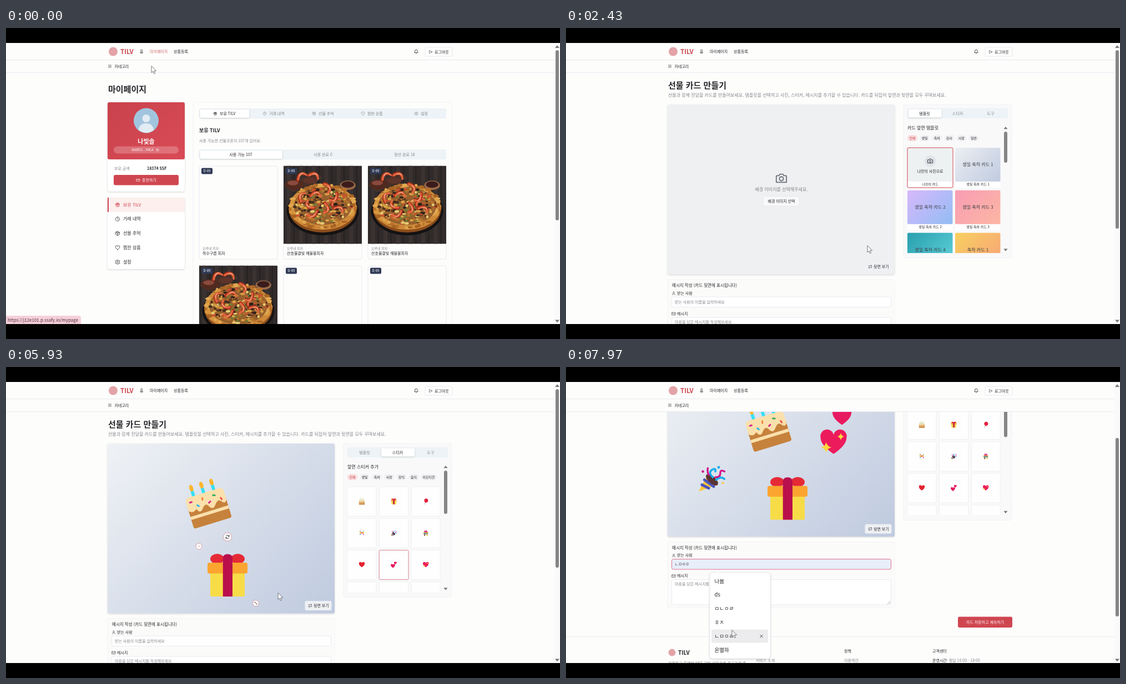
These frames come from a looping animation (998 by 561 pixels, 8000 ms). An HTML page:

```html
<!DOCTYPE html>
<html lang="ko">
<head>
<meta charset="utf-8">
<style>
html, body { margin: 0; width: 100%; height: 100%; overflow: hidden; background: #000; }
svg { display: block; width: 998px; height: 561px; font-family: "Noto Sans CJK KR", "Noto Sans CJK", "Noto Sans", sans-serif; }
.soft { filter: drop-shadow(0 1px 1.5px rgba(0,0,0,.16)); }
</style>
</head>
<body>
<svg id="stage" viewBox="0 0 998 561"></svg>
<script>
const RED = '#cf4650', INK = '#27272c', GRAY = '#85868c', LINE = '#e9eaf1', PAPER = '#fdfdfc', TABS = '#edf3f6';
const BRAND = 'TILV', SHOP = '모루네 피자', DISH = '산호물결빛 해물볼피자';

// Drawing helpers: each returns SVG markup
const rect = (x, y, w, h, fill, r = 0, stroke = 'none', more = '') =>
  `<rect x="${x}" y="${y}" width="${w}" height="${h}" rx="${r}" fill="${fill}" stroke="${stroke}" ${more}/>`;
const circle = (x, y, r, fill, stroke = 'none') => `<circle cx="${x}" cy="${y}" r="${r}" fill="${fill}" stroke="${stroke}"/>`;
const text = (x, y, size, str, fill = INK, weight = 400, anchor = 'start') =>
  `<text x="${x}" y="${y}" font-size="${size}" fill="${fill}" font-weight="${weight}" text-anchor="${anchor}">${str}</text>`;
const mid = (x, y, size, str, fill, weight) => text(x, y, size, str, fill, weight, 'middle');
const path = (d, fill, stroke = 'none', width = 1) =>
  `<path d="${d}" fill="${fill}" stroke="${stroke}" stroke-width="${width}" stroke-linecap="round" stroke-linejoin="round"/>`;
const line = (y, x = 0, w = 988) => rect(x, y, w, 1, LINE);
const group = (id, body, more = '') => `<g id="${id}" ${more}>${body}</g>`;
const times = (n, fn) => Array.from({ length: n }, (_, i) => fn(i)).join('');
const use = (id, x, y, size) => `<use href="#${id}" x="${x - size / 2}" y="${y - size / 2}" width="${size}" height="${size}"/>`;
const symbol = (id, size, body, overflow = 'visible') => `<symbol id="${id}" viewBox="0 0 ${size} ${size}" overflow="${overflow}">${body}</symbol>`;

let gradients = 0;
function gradientRect(x, y, w, h, from, to, r = 2) {
  const id = 'grad' + gradients++, k = (w + h) / 4, cx = x + w / 2, cy = y + h / 2;
  return `<linearGradient id="${id}" gradientUnits="userSpaceOnUse" x1="${cx - k}" y1="${cy - k}" x2="${cx + k}" y2="${cy + k}">
    <stop stop-color="${from}"/><stop offset="1" stop-color="${to}"/></linearGradient>` + rect(x, y, w, h, `url(#${id})`, r);
}

// Line icons on a 24 unit grid
const icons = {
  bell: 'M6 9a6 6 0 0 1 12 0c0 6 3 8 3 8H3s3-2 3-8M10 21h4',
  logout: 'M9 21H4V3h5M16 17l5-5-5-5M21 12H9',
  menu: 'M3 5h18M3 12h18M3 19h18',
  gift: 'M3 8h18v4H3zM5 12v9h14v-9M12 8v13M12 8C5 8 5 2 9 3q2 1 3 5c0-5 5-7 6-3q0 3-6 3',
  clock: 'M12 2a10 10 0 1 0 .1 0M12 6v6l4 2',
  box: 'M12 2l9 5v10l-9 5-9-5V7zM3 7l9 5 9-5M12 12v10M7 4l9 5',
  heart: 'M12 21C4 15 2 12 2 8a5 5 0 0 1 10-2 5 5 0 0 1 10 2c0 4-2 7-10 13z',
  gear: 'M10 2h4l1 3 3 1 3-1 1 4-2 3 2 3-1 4-3-1-3 1-1 3h-4l-1-3-3-1-3 1-1-4 2-3-2-3 1-4 3 1 3-1zM12 9a3 3 0 1 0 .1 0',
  copy: 'M8 8h13v13H8zM16 8V3H3v13h5',
  card: 'M2 5h20v14H2zM2 10h20',
  back: 'M15 18l-6-6 6-6',
  camera: 'M3 7h4l2-3h6l2 3h4q1 0 1 1v11q0 1-1 1H3q-1 0-1-1V8q0-1 1-1M12 9a4 4 0 1 0 .1 0',
  user: 'M12 3a4.5 4.5 0 1 0 .1 0M4 22q0-8 8-8t8 8',
  mail: 'M2 4h20v16H2zM2 7l10 7 10-7',
  swap: 'M17 2l4 4-4 4M3 11V6h18M7 22l-4-4 4-4M21 13v5H3',
  turn: 'M21 3v6h-6M21 9A9 9 0 0 0 4 8M3 21v-6h6M3 15a9 9 0 0 0 17 1',
  scale: 'M10 3H3v7M3 3l18 18M14 21h7v-7',
  close: 'M5 5l14 14M19 5L5 19',
  move: 'M12 1v22M1 12h22M9 4l3-3 3 3M9 20l3 3 3-3M4 9l-3 3 3 3M20 9l3 3-3 3'
};
const icon = (name, x, y, size = 8, color = INK, width = 2) =>
  `<g transform="translate(${x - size / 2} ${y - size / 2}) scale(${size / 24})">${path(icons[name], 'none', color, width)}</g>`;

let seed = 7;
const random = () => (seed = seed * 16807 % 2147483647) / 2147483647;
const ellipse = (x, y, rx, ry, fill) => `<ellipse cx="${x}" cy="${y}" rx="${rx}" ry="${ry}" fill="${fill}"/>`;
// Small blobs inside an ellipse; inner = 0 fills it, towards 1 leaves only its rim
const scatter = (n, rx, ry, inner, size, palette) => times(n, () => {
  const a = random() * 6.283, d = Math.sqrt(inner + (1 - inner) * random());
  return ellipse(50 + Math.cos(a) * d * rx, 52 + Math.sin(a) * d * ry, size * (.6 + random()), size * (.5 + random() * .5), palette[random() * palette.length | 0]);
});
const shrimp = (x, y, turn) => `<g transform="translate(${x} ${y}) rotate(${turn})">` +
  path('M-5 5Q-6-4 1-4', 'none', '#a5301c', 4) + path('M-4.5 4.5Q-5-4.5 1-4.5L5-3', 'none', '#e2663f', 2.4) + path('M-3.5 0Q-3-4 0-4.5', 'none', '#f3b08c', .9) + '</g>';

const pizza = rect(0, 0, 100, 100, '#302b2a') +
  times(7, i => rect(i * 16 - 3, 0, .7, 100, '#1f1b1b') + rect(i * 16 + 4, 0, 5, 100, '#3a3331')) +
  path('M0 25L42 8l8 8L12 34z', '#46312a') + ellipse(14, 24, 12, 6.5, '#51291f') + ellipse(12, 22, 7, 3, '#8a4a3d') +
  ellipse(34, 19, 9, 4, '#5e3329') + shrimp(24, 14, 10) + shrimp(39, 14, 60) +
  ellipse(82, 25, 10, 6, '#9a6a48') + ellipse(82, 24, 8, 4.2, '#3a1c1c') +
  ellipse(50, 58, 46, 31, '#141213') + ellipse(50, 55.5, 43.5, 30, '#8a4c1b') + ellipse(50, 53, 43, 29, '#cc8838') +
  scatter(90, 42, 28, .75, 2.6, ['#e0a850', '#b8702a', '#d8963e', '#a86324']) + ellipse(50, 51.5, 37, 24, '#96602d') +
  scatter(230, 37, 23, 0, 2, ['#d9a445', '#4a3020', '#6f7d36', '#e6ca74', '#643823', '#b5722c', '#2d211b', '#c9542f']) +
  times(9, i => shrimp(50 + (17 + i % 2 * 10) * Math.cos(i * .7), 46 + (9 + i % 2 * 8) * Math.sin(i * .7), i * 67));

const heartPath = 'M16 29C6 22 1 16 1 10A7.6 7.6 0 0 1 16 7A7.6 7.6 0 0 1 31 10C31 16 26 22 16 29Z';
const star = (x, y, r) => path(`M${x} ${y - r}Q${x + r * .2} ${y - r * .2} ${x + r} ${y}Q${x + r * .2} ${y + r * .2} ${x} ${y + r}Q${x - r * .2} ${y + r * .2} ${x - r} ${y}Q${x - r * .2} ${y - r * .2} ${x} ${y - r}`, '#fcd83e');
const sprinkles = ['#d4218b', '#20b0e8', '#f08030', '#d4218b', '#3aa860', '#f05050'];

const defs = '<defs>' + symbol('pizza', 100, pizza, 'hidden') +
  symbol('cake', 32,
    [8, 16, 24].map(x => rect(x - 1.2, 5, 2.4, 7, '#35e0f2') + ellipse(x, 2.8, 1.5, 2.6, '#fdb62f')).join('') +
    rect(1, 16, 30, 17, '#c6823c', 1.5) + rect(1, 23.5, 30, 2.4, '#fae0ac') +
    path('M1 12q0-3 3-3h24q3 0 3 3v7q-2 3-4 0t-5 1-5 0-5 0-5-1q-3 3-6 0z', '#fae0ac') +
    sprinkles.map((c, i) => `<g transform="rotate(${i * 50} ${4.5 + i * 4.6} ${13 + i % 2 * 4})">${rect(3.2 + i * 4.6, 12.4 + i % 2 * 4, 2.7, 1.2, c, .6)}</g>`).join('')) +
  symbol('gift', 32, rect(3.6, 14, 24.8, 17.6, '#f7dc48', 1) + ellipse(8.6, 4.4, 5, 3.6, '#e52a36') + ellipse(23.4, 4.4, 5, 3.6, '#e52a36') +
    rect(1.6, 7.2, 28.8, 7.8, '#fba530', 1.2) + path('M12.7 31.6V4q0-3 3.4-3t3.5 3v27.6z', '#b90f4b')) +
  symbol('balloon', 32, path('M15 20Q8 25 9 32', 'none', '#888', 1.4) + ellipse(18, 11, 10, 10.5, '#e3203c') + path('M14 20l-2 4 5-1z', '#b81730')) +
  symbol('ball', 32, path('M4 9l12 4 12-4-2 10-10-3-10 3z', '#f2c02e') + circle(16, 14, 4, '#e33b6b') + circle(8, 22, 3, '#2fa3d8') + circle(24, 23, 3, '#d33b9e') + rect(6, 4, 4, 4, '#7b4a3a') + rect(22, 4, 4, 4, '#3aa860')) +
  symbol('popper', 32, path('M10 13L23 24 0 32z', '#fdc93a') + path('M7 18l11 8M4 24l8 4', 'none', '#4b55be', 3.4) +
    `<g transform="rotate(42 16 18)">${ellipse(16, 18, 9, 4.2, '#5b3434')}</g>` +
    path('M17 15q-6-6-1-9t4 2M21 18q5-5 10-1', 'none', '#18aeee', 2.4) + path('M12 12q-2-4-1-8M20 15q6 0 6-5t5-2', 'none', '#d2128a', 2.2) +
    circle(24, 3, 1.6, '#18aeee') + circle(5, 8, 1.5, '#d2128a') + circle(29, 22, 1.4, '#fdc93a')) +
  symbol('pinata', 32, rect(4, 10, 24, 12, '#e0913a', 2) + rect(8, 2, 16, 9, '#e0418a', 2) + rect(6, 16, 20, 5, '#3aa5c8') + rect(7, 22, 6, 8, '#8a4a34') + rect(20, 22, 6, 8, '#f0c030')) +
  symbol('heart', 32, path(heartPath, '#e5202f')) +
  symbol('hearts', 32, `<g transform="translate(-.6 10.5) scale(.75)">${path(heartPath, '#e81a60')}</g><g transform="translate(16.2 -1) scale(.49)">${path(heartPath, '#e81a60')}</g>`) +
  symbol('sparkle', 32, path(heartPath, '#ec1b5c') + star(7.5, 21.5, 6) + star(24.3, 9, 4)) +
  `<clipPath id="panelClip">${rect(608, 208, 180, 198, '#000')}</clipPath></defs>`;

const badge = (x, y) => rect(x, y, 20, 11, '#303a55', 2) + mid(x + 10, y + 7.8, 6, 'D-89', '#fff', 500);
const arrowUp = (x, y, s = 4) => path(`M${x - s} ${y + s / 2}h${2 * s}l${-s} ${-s * 1.2}z`, '#757575');
const arrowDown = (x, y, s = 4) => path(`M${x - s} ${y - s / 2}h${2 * s}l${-s} ${s * 1.2}z`, '#757575');

const header = rect(0, 27, 998, 53, PAPER) + line(57) + line(80) + circle(193, 42.5, 8, '#e3a3a7') +
  text(206, 46.7, 11.5, BRAND, RED, 700) + text(241, 45, 7, '홈') + group('navMine', text(259, 45, 7, '마이페이지')) +
  text(302, 45, 7, '상품등록') + icon('bell', 739, 42.5, 9) + rect(755, 35, 49, 16, PAPER, 2, LINE) + icon('logout', 765, 43, 7) +
  text(772, 45.5, 7, '로그아웃') + icon('menu', 187, 69, 7) + text(195.5, 71.5, 7, '카테고리');

const column = (x, title, items) => text(x, 28.5, 7, title, INK, 500) + items.map((s, i) => text(x, 45.5 + i * 12.8, 7, s, GRAY)).join('');
const bold = (label, rest) => `<tspan fill="${INK}" font-weight="500">${label}</tspan> ${rest}`;
const footer = y => `<g transform="translate(0 ${y})">` + line(0) + circle(191, 29, 6.5, '#e3a3a7') + text(202, 33, 10, BRAND, INK, 700) +
  text(184, 51, 7, '안전하고 투명한 NFT 기반 선물쿠폰 중고거래 플', GRAY) + text(184, 60, 7, '랫폼입니다.', GRAY) +
  times(5, i => circle(187.5 + i * 16.7, 75, 4.5, '#696a70')) +
  column(342, '서비스', ['서비스 소개', '이용 가이드', '자주 묻는 질문', '공지사항', '이벤트']) +
  column(501, '정책', ['이용약관', '개인정보처리방침', '청소년보호정책', '위치기반서비스 이용약관']) +
  column(660, '고객센터', [bold('운영시간:', '평일 10:00 - 18:00'), bold('점심시간:', '12:30 - 13:30'), bold('휴무일:', '주말 및 공휴일')]) +
  rect(660, 81.5, 52, 17, RED, 2.5) + mid(686, 92.5, 7, '1:1 문의하기', '#fff') + '</g>';

// Pages
const menu = [['gift', `보유 ${BRAND}`], ['clock', '거래 내역'], ['box', '선물 추억'], ['heart', '찜한 상품'], ['gear', '설정']];
function productCard(i) {
  const x = 348 + i % 3 * 152, y = 249 + (i / 3 | 0) * 180, photo = use('pizza', x + 70.5, y + 70, 141);
  return rect(x, y, 141, 168, PAPER, 3, LINE) + (i % 4 && i < 4 ? photo : `<g class="late">${photo}</g>`) + badge(x + 4, y + 3.5) +
    text(x + 6, y + 151, 6, SHOP, GRAY) + text(x + 6, y + 159.5, 7, i ? DISH : '옥수구름 피자');
}
const myPage = text(184, 115.5, 15, '마이페이지', INK, 700) +
  `<g class="soft">${rect(183, 134, 139, 161, '#fff', 4)}</g>` + gradientRect(183, 134, 139, 103, '#c9424c', '#d94b56', 3) +
  circle(252.5, 167, 22.5, '#a2c5df') + circle(252.5, 163, 7, '#e3ecf3') + path('M239 184q1-12 13.5-12t13.5 12q-13 10-27 0', '#e3ecf3') +
  mid(252.5, 208.5, 11, '나빛솔', '#fff', 700) + rect(194, 213.5, 117, 13, 'rgba(255,255,255,.22)', 6.5) +
  mid(246, 222, 6, '0x8B31...94CA', '#fff') + icon('copy', 273, 220, 5.5, '#fff') +
  text(195, 255.5, 7, '보유 금액', GRAY) + text(254, 255.5, 7, '18374 SSF', INK, 700) +
  rect(194, 265, 117, 18.5, RED, 3) + icon('card', 238, 274.5, 7, '#fff') + text(245, 276.5, 7, '충전하기', '#fff') +
  `<g class="soft">${rect(183, 306, 139, 129, '#fff', 3)}</g>` + rect(183, 306, 139, 26, '#fcefee', 2) + rect(183, 306, 2, 26, RED) +
  menu.map(([name, label], i) => icon(name, 201, 318.7 + i * 25.9, 9, i ? INK : RED) + text(211, 321.5 + i * 25.9, 8, label, i ? INK : RED)).join('') +
  rect(337, 134, 467, 440, 'none', 3, '#f3f3f7') + rect(348, 145, 445, 18.5, TABS, 3) + `<g class="soft">${rect(349.5, 147, 88.5, 15, '#fff', 2)}</g>` +
  menu.map(([name, label], i) => { const x = [377, 466, 555, 643, 739][i]; return icon(name, x, 154.3, 7, i ? GRAY : INK) + text(x + 8, 156.7, 7, label, i ? GRAY : INK, i ? 400 : 500); }).join('') +
  text(348, 188, 9, `보유 ${BRAND}`, INK, 700) + text(348, 205.5, 7, '사용 가능한 선물쿠폰이 107개 있어요.', GRAY) +
  rect(348, 219, 445, 18.5, TABS, 3) + `<g class="soft">${rect(349.5, 221, 148, 15, '#fff', 2)}</g>` +
  mid(423, 230.5, 7, '사용 가능 107', INK, 500) + mid(571, 230.5, 7, '사용 완료 0', GRAY) + mid(718, 230.5, 7, '정산 완료 18', GRAY) +
  times(6, productCard);

const detailPage = icon('back', 409, 97, 7, GRAY) + text(414.5, 99, 7, '뒤로가기', GRAY) +
  `<g class="soft">${rect(393, 103, 202, 302.5, '#fff', 5)}</g>` + use('pizza', 494, 204, 202) + badge(397, 107.5) +
  text(401, 319, 7, SHOP, GRAY) + text(401, 334, 10.4, DISH, INK, 700) +
  text(401, 350.3, 7, bold('시리얼 번호:', '100296')) + text(401, 362, 7, bold('유효 기간:', '2025. 7. 8.')) +
  rect(401, 376.5, 90, 21.5, RED, 3) + mid(446, 389.5, 7, '사용하기 (QR 스캔)', '#fff') +
  rect(497, 376.5, 90, 21.5, '#fff', 3, LINE) + mid(542, 389.5, 7, '선물하기', INK, 500) + footer(428);

const pills = (labels) => labels.map((s, i) => {
  const w = s.length > 2 ? 28 : 18, x = 615 + i * 22.1;
  return rect(x, 193, w, 11, i ? '#f1f1f4' : '#f8dddd', 5.5) + mid(x + w / 2, 200.8, 6, s, i ? INK : RED);
}).join('');
const tabs = (active) => rect(615, 145, 181, 18, TABS, 3) + `<g class="soft">${rect(616.5 + active * 59.5, 146.5, 60, 15, '#fff', 2)}</g>` +
  ['템플릿', '스티커', '도구'].map((s, i) => mid(646 + i * 59.5, 156.5, 7, s, i == active ? INK : GRAY, i == active ? 500 : 400)).join('');
const colors = [['#eef1f2', '#eef1f2'], ['#eceff3', '#c0cbdf'], ['#d8b8fa', '#92bdf5'], ['#f99cb4', '#fbb7a3'], ['#289fae', '#62d3dc'], ['#f8d05f', '#f6a279']];
const templateNames = ['나만의 카드', '생일 축하 카드 1', '생일 축하 카드 2', '생일 축하 카드 3', '생일 축하 카드 4', '축하 카드 1'];
const templates = tabs(0) + text(615, 183, 8, '카드 앞면 템플릿', INK, 500) + pills(['전체', '생일', '축하', '감사', '사랑', '일반']) +
  '<g clip-path="url(#panelClip)">' + templateNames.map((name, i) => {
    const x = 615 + i % 2 * 86, y = 216 + (i / 2 | 0) * 76.8;
    return rect(x, y, 81.5, 72, '#fff', 2) + gradientRect(x, y, 81.5, 61, ...colors[i]) + mid(x + 41, y + 68, 6, name, INK, 500) +
      (i ? mid(x + 41, y + 33, 8, name, '#3b3c42') : circle(x + 41, y + 24, 10.5, '#e2e4ea') + icon('camera', x + 41, y + 24, 11) + mid(x + 41, y + 45, 7, '나만의 사진으로', INK, 500));
  }).join('') + group('pickCustom', rect(615, 216, 82, 72, 'none', 2, RED)) + group('pickFirst', rect(701, 216, 82, 72, 'none', 2, RED)) + '</g>' +
  rect(789, 187, 6, 56, '#858585', 3);

const cellX = i => 641 + i % 3 * 57.6, cellY = i => 242.5 + (i / 3 | 0) * 57.2;
const cellIcons = ['cake', 'gift', 'balloon', 'ball', 'popper', 'pinata', 'heart', 'hearts', 'sparkle'];
const stickerPanel = tabs(1) + text(615, 183, 8, '앞면 스티커 추가', INK, 500) + pills(['전체', '생일', '축하', '사랑', '장식', '음식', '이모티콘']) +
  '<g clip-path="url(#panelClip)">' + times(12, i => rect(cellX(i) - 26, cellY(i) - 26.5, 52, 53, '#fefefe', 2, '#f0f0f5') + (i < 9 ? use(cellIcons[i], cellX(i), cellY(i), 11) : '')) +
  group('cellPick', rect(-26.5, -26.5, 53, 53, 'none', 2, '#d98890')) + '</g>' + rect(789, 187, 6, 78, '#858585', 3);

const cardPage = text(184, 109, 15, '선물 카드 만들기', INK, 700) +
  text(184, 124, 8, '선물과 함께 전달할 카드를 만들어보세요. 템플릿을 선택하고 사진, 스티커, 메시지를 추가할 수 있습니다. 카드를 뒤집어 앞면과 뒷면을 모두 꾸며보세요.', GRAY) +
  `<g class="soft">${rect(183, 138, 409, 306.5, '#eef0f1', 3)}</g>` +
  group('empty', icon('camera', 388, 271, 22, '#6d7079') + mid(388, 293.5, 8, '배경 이미지를 선택해주세요.', GRAY) +
    rect(355, 304, 65, 17, '#f9f9fa', 2, LINE) + mid(388, 315, 7, '배경 이미지 선택', INK, 500)) +
  group('filled', gradientRect(183, 138, 409, 306.5, '#eff2f5', '#bfcadf', 3)) + group('stickers', '') +
  rect(538.5, 422, 48, 17, '#eef0f3', 3) + icon('swap', 548, 430.5, 7) + text(554, 433, 7, '뒷면 보기', INK, 500) +
  rect(183, 454, 409, 119, '#fbfbfa', 3, '#f3f3f6') + text(191, 467.3, 7.5, '메시지 작성 (카드 뒷면에 표시됩니다)', INK, 500) +
  icon('user', 194, 478.5, 7) + text(200, 480.7, 7, '받는 사람', INK, 500) + rect(190.5, 485, 395, 18.5, '#fff', 3, LINE, 'id="field"') +
  group('fieldText', text(196, 496.5, 7, '받는 사람의 이름을 입력하세요', GRAY)) +
  icon('mail', 194, 515.5, 7) + text(200, 517.5, 7, '메시지', INK, 500) + rect(190.5, 522, 395, 45.5, '#fff', 3, LINE) +
  text(196, 532.5, 7, '마음을 담은 메시지를 작성해보세요.', GRAY) + path('M579 566l5-5M582 566l2-2', 'none', '#777', .6) +
  rect(706, 589, 98, 19.5, RED, 3) + mid(755, 601.5, 7, '카드 저장하고 계속하기', '#fff') +
  rect(608, 138, 195, 277, '#f9f9fa', 3, '#f3f3f6') + group('templates', templates) + group('stickerPanel', stickerPanel) +
  arrowUp(792, 180.5, 3.5) + arrowDown(792, 400, 3.5) + footer(624.5);

const choices = ['나봄', 'ds', 'ㅁㄴㅇㄹ', 'ㅎㅈ', 'ㄴㅁㅇㄹ', '온별하'];
const dropdown = `<g class="soft">${path('M268 371l5-5 5 5z', '#fff')}${rect(259, 371, 109, 155, '#fff', 4, '#ececf0')}</g>` +
  rect(262, 374, 102, 24, '#ecebee', 3, 'none', 'id="choiceRow"') + choices.map((s, i) => text(267.5, 389.5 + i * 24.9, 9.5, s)).join('') +
  group('choiceClose', icon('close', 352, 386, 8, INK, 2.4));

const $ = id => document.getElementById(id);
$('stage').innerHTML = defs + rect(0, 27, 998, 507, PAPER) + group('myPage', myPage) + group('detailPage', detailPage) + group('cardPage', cardPage) + header +
  group('dropdown', dropdown) + rect(988, 27, 10, 507, '#fafafa') + arrowUp(993, 34) + arrowDown(993, 528.5) + rect(990, 40, 6, 307, '#858585', 3, 'none', 'id="thumb"') +
  group('address', path('M0 519h131q4 0 4 4v11H0z', '#f6cfda') + text(3, 530, 8, 'https://j12e101.p.ssafy.io/mypage', '#4c3038')) +
  rect(0, 0, 998, 27, '#000') + rect(0, 534, 998, 27, '#000') +
  group('cursor', group('pointer', path('M0 0v11.5l2.7-2.3 1.9 4.3 1.9-.9-1.9-4.1 3.6-.2z', '#fff', '#55555c', .8)) +
    group('mover', icon('move', 0, 0, 15, '#fff', 6) + icon('move', 0, 0, 14, '#444', 2)));

// Timeline: rows of [time, ...values], eased between rows
function tween(keys, t) {
  const next = keys.findIndex(k => k[0] > t);
  if (next < 0) return keys[keys.length - 1].slice(1);
  if (!next) return keys[0].slice(1);
  const a = keys[next - 1], b = keys[next], p = (t - a[0]) / (b[0] - a[0]), e = p * p * (3 - 2 * p);
  return a.slice(1).map((v, i) => v + (b[i + 1] - v) * e);
}
const cursorPath = [[150, 262, 69], [800, 570, 330], [1000, 570, 330], [1300, 553, 329], [1470, 553, 329], [1850, 543, 390], [2430, 543, 393],
  [3100, 735, 250], [3400, 735, 250], [4070, 647, 206], [4350, 705, 154], [4450, 705, 154], [4700, 641, 243], [4780, 641, 243],
  [4880, 388, 293], [5150, 259, 337], [5170, 259, 337], [5220, 297, 370], [5330, 311, 384], [5380, 262, 270], [5440, 244, 272], [5480, 262, 335],
  [5580, 361, 243], [5680, 699, 243], [5760, 388, 291], [5840, 399, 375], [5900, 440, 420], [6010, 699, 357], [6100, 388, 291], [6200, 504, 218],
  [6290, 756, 357], [6370, 388, 291], [6450, 482, 275], [6550, 699, 302], [6630, 662, 312], [6750, 388, 291], [6900, 262, 339],
  [7050, 300, 420], [7350, 273, 356], [7500, 273, 358], [7900, 299, 475]];
// Sticker rows: time, x, y, size, rotation
const stickers = [
  ['cake', 0, [[4780, 388, 291, 48, 0], [4880, 388, 291, 48, 0], [5150, 261.5, 335, 48, 0], [5220, 261.5, 335, 48, 0], [5330, 261.5, 335, 76, 0],
    [5380, 261.5, 335, 76, 0], [5440, 261.5, 335, 76, -17], [5480, 261.5, 335, 76, -17], [5580, 361, 243, 76, -17]]],
  ['gift', 1, [[5690, 388, 291, 48, 0], [5760, 388, 291, 48, 0], [5840, 399, 375, 48, 0], [5900, 399, 375, 80, 0]]],
  ['hearts', 7, [[6020, 388, 291, 48, 0], [6100, 388, 291, 48, 0], [6200, 504, 218.5, 48, 0]]],
  ['sparkle', 8, [[6300, 388, 291, 48, 0], [6370, 388, 291, 48, 0], [6450, 482, 275, 50, 0]]],
  ['popper', 4, [[6560, 388, 291, 48, 0], [6750, 388, 291, 48, 0], [6900, 263, 339, 48, 0]]]
];
const drags = [[4830, 5190], [5470, 5590], [5740, 5850], [6080, 6210], [6350, 6460], [6720, 6910]];

const handle = (x, y, r, name, size, color) => circle(x, y, r, '#fff', '#dc9aa0') + icon(name, x, y, size, color, 2.6);
function drawSticker([name, , keys], i, t) {
  if (t < keys[0][0]) return '';
  const [x, y, size, turn] = tween(keys, t), h = size / 2, until = stickers[i + 1] ? stickers[i + 1][2][0][0] : 7000;
  return `<g transform="translate(${x} ${y}) rotate(${turn})">` + use(name, 0, 0, size) + (t < until ?
    handle(-h - 11.5, -h - 11.5, 5.5, 'close', 4, RED) + handle(0, -h - 28.5, 7.5, 'turn', 8, INK) + handle(h + 11, h + 11, 5.5, 'scale', 5, INK) : '') + '</g>';
}
const show = (id, on) => $(id).style.display = on ? '' : 'none';

function render(t) {
  const onMine = t < 1000, onCard = t >= 2000, chosen = t >= 3300, stickerTab = t >= 4420;
  const [x, y] = tween(cursorPath, t), [scroll] = tween([[7000, 0], [7250, 138.5]], t);
  show('myPage', onMine);
  show('detailPage', !onMine && !onCard);
  show('cardPage', onCard);
  show('address', t < 400);
  document.querySelectorAll('.late').forEach(el => el.style.display = t < 300 ? 'none' : '');
  $('navMine').firstChild.setAttribute('fill', t < 400 ? '#d4686a' : INK);

  $('cardPage').setAttribute('transform', `translate(0 ${-scroll})`);
  $('thumb').setAttribute('y', 40 + scroll * .635);
  $('thumb').setAttribute('height', onMine ? 307 : onCard ? 322 : 435);
  show('empty', !chosen);
  show('filled', chosen);
  show('pickCustom', !chosen);
  show('pickFirst', chosen);
  show('templates', !stickerTab);
  show('stickerPanel', stickerTab);
  $('stickers').innerHTML = stickers.map((s, i) => drawSticker(s, i, t)).join('');
  const picked = stickers.find(([, , keys]) => Math.abs(t - keys[0][0]) < 100);
  show('cellPick', picked);
  if (picked) $('cellPick').setAttribute('transform', `translate(${cellX(picked[1])} ${cellY(picked[1])})`);

  const focused = t >= 7400, open = t >= 7450, row = open ? Math.floor((y - 374) / 24.9) : -1;
  show('dropdown', open);
  show('choiceRow', row >= 0);
  show('choiceClose', row >= 0);
  $('choiceRow').setAttribute('y', 374 + row * 24.9);
  $('choiceClose').setAttribute('transform', `translate(0 ${row * 24.9})`);
  $('field').setAttribute('stroke', focused ? '#e0708c' : LINE);
  $('field').setAttribute('fill', row >= 0 ? '#e8eefa' : '#fff');
  const label = $('fieldText').firstChild;
  label.textContent = row >= 0 ? choices[row] : '받는 사람의 이름을 입력하세요';
  label.setAttribute('fill', row >= 0 ? INK : GRAY);

  const dragging = drags.some(([from, to]) => t >= from && t < to);
  show('pointer', !dragging);
  show('mover', dragging);
  $('cursor').setAttribute('transform', `translate(${x} ${y})`);
}

const start = performance.now();
function frame() {
  render((performance.now() - start) % 8000);
  requestAnimationFrame(frame);
}
frame();
</script>
</body>
</html>
```
